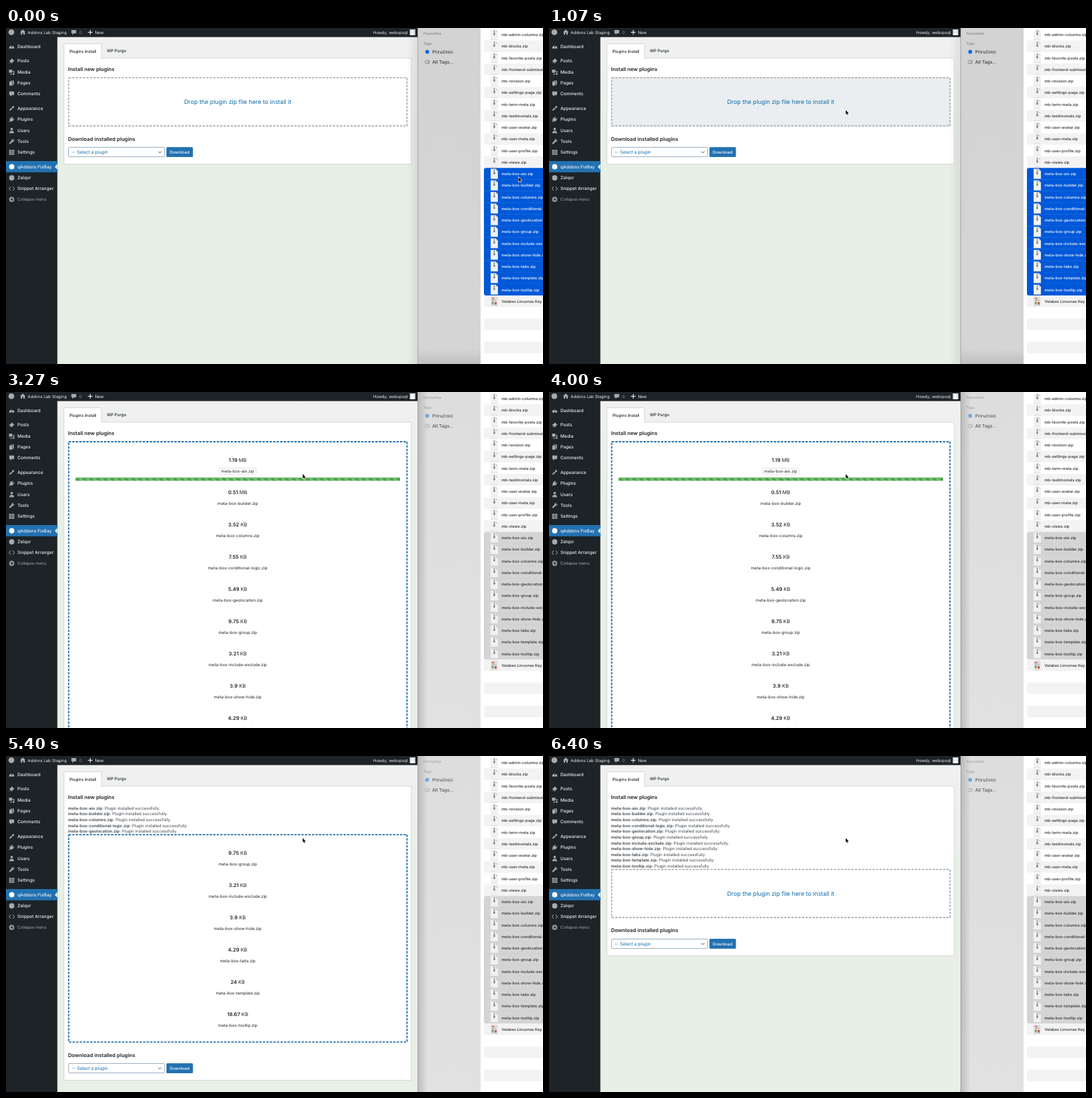
These frames come from a looping animation (800x500 px, 6.73 s). An HTML page with a canvas:

```html
<!DOCTYPE html>
<html lang="en">
<head>
<meta charset="utf-8">
<title>Plugin upload</title>
<style>
html, body { margin: 0; width: 100%; height: 100%; overflow: hidden; background: #e8efe7; }
canvas { display: block; }
</style>
</head>
<body>
<canvas id="stage" width="800" height="500"></canvas>
<script>
const c = document.getElementById('stage').getContext('2d');
const LOOP = 6730, DROP = 1200, ROW = 17.24, LINE = 8.62;
const DARK = '#1d2327', BLUE = '#2271b1', LINK = '#0a6aa6', PAGE = '#e8efe7';

const uploads = [
  ['aio', '1.19', 'MB'], ['builder', '0.51', 'MB'], ['columns', '3.52', 'KB'],
  ['conditional-logic', '7.55', 'KB'], ['geolocation', '5.49', 'KB'], ['group', '9.75', 'KB'],
  ['include-exclude', '3.21', 'KB'], ['show-hide', '3.9', 'KB'], ['tabs', '4.29', 'KB'],
  ['template', '24', 'KB'], ['tooltip', '18.67', 'KB']
].map(([id, size, unit]) => ({ name: `meta-box-${id}.zip`, size, unit }));
const doneAt = [4330, 5130, 5200, 5270, 5400, 5530, 5730, 5930, 6070, 6200, 6400];

const others = ['admin-columns', 'blocks', 'favorite-posts', 'frontend-submission', 'revision',
  'settings-page', 'term-meta', 'testimonials', 'user-avatar', 'user-meta', 'user-profile', 'views'];
const files = [...others.map(n => `mb-${n}.zip`), ...uploads.map(u => u.name), 'Velabex Lincense Key'];

// label, y, icon path around (0,0); "o" marks a plain disc
const menu = [
  ['Dashboard', 27.5, 'M-4 3A4 4 0 1 1 4 3ZM-.5 1.5L2 -2'],
  ['Posts', 49, 'M0 -4L4 0L2.8 .4L1 2.2L.8 4L-1.2 2L-4 4L-2 1.2L-4 -.8L-2.2 -1L-.4 -2.8Z'],
  ['Media', 65.5, 'M-4 -3.5H1V1H-4ZM2 -1.5H4V3A1.3 1.3 0 1 1 2.8 1.8H3V0H2ZM-1 2H0V4H-2.5V3H-1Z'],
  ['Pages', 82, 'M-3.5 -2.5H1V3.8H-3.5ZM-1.5 -3.8H3.2V2.6H1.6V-3.1H-1.5Z'],
  ['Comments', 98, 'M-3.6 -3.4H3.6V1.8H.4L-2 4V1.8H-3.6Z'],
  ['Appearance', 119.5, 'M0 -1L2 -4L4 -2L1.4 .4ZM-.6 -.6L1 1L-1 2.4L-4 4L-2.6 1Z'],
  ['Plugins', 136, 'M1 -4L1.8 -3.4L.6 -1.8L1.8 -.6L3.4 -1.8L4 -1L2.6 .4L3 1L.8 3L-1.4 2.8L-3.6 4L-4 3.6L-2.8 1.4L-3 -.8L-1 -3L-.4 -2.4Z'],
  ['Users', 152.5, 'M0 -4A1.9 1.9 0 1 1 -.01 -4ZM-3.6 4Q-3.4 .2 0 .4Q3.4 .2 3.6 4Z'],
  ['Tools', 169, 'M1 -3.8L3 -3.8L1.4 -2L2.2 -1.2L4 -2.8Q4.2 .4 1.2 .4L-2.4 4L-4 2.4L-.4 -1.2Q-.4 -3.4 1 -3.8Z'],
  ['Settings', 185, 'M-3.8 -3.8H-.4V3.8H-3.8ZM.4 -3.8H3.8V3.8H.4Z'],
  ['qAddons FixBay', 206.5, 'o'],
  ['Zelqor', 223, 'o'],
  ['Snippet Arranger', 239, ''],
  ['Collapse menu', 255, 'o']
];

const clamp = v => Math.max(0, Math.min(1, v));
const ease = v => v * v * (3 - 2 * v);

function rect(x, y, w, h, fill, r = 0) {
  c.fillStyle = fill;
  c.beginPath();
  c.roundRect(x, y, w, h, r);
  c.fill();
}
function frame(x, y, w, h, stroke, r = 0, width = .8) {
  c.strokeStyle = stroke;
  c.lineWidth = width;
  c.beginPath();
  c.roundRect(x, y, w, h, r);
  c.stroke();
}
function disc(x, y, r, fill) {
  c.fillStyle = fill;
  c.beginPath();
  c.arc(x, y, r, 0, 7);
  c.fill();
}
function line(stroke, width, ...pts) {
  c.strokeStyle = stroke;
  c.lineWidth = width;
  c.beginPath();
  for (let i = 0; i < pts.length; i += 2) c.lineTo(pts[i], pts[i + 1]);
  c.stroke();
}
function setFont(size, weight) {
  c.font = `${weight} ${size}px Inter, sans-serif`;
  c.textRendering = 'geometricPrecision';
}
function text(s, x, y, size, fill, weight = 400, align = 'left') {
  setFont(size, weight);
  c.textBaseline = 'middle';
  c.textAlign = align;
  c.fillStyle = fill;
  c.fillText(s, x, y + .5);
  return c.measureText(s).width;
}
function icon(path, x, y, fill) {
  c.save();
  c.translate(x, y);
  c.fillStyle = fill;
  c.fill(new Path2D(path));
  c.restore();
}
function gradient(x0, y0, x1, y1, from, to) {
  const g = c.createLinearGradient(x0, y0, x1, y1);
  g.addColorStop(0, from);
  g.addColorStop(1, to);
  return g;
}
function shade(x0, x1, alpha) {
  rect(Math.min(x0, x1), 0, Math.abs(x1 - x0), 500,
    gradient(x0, 0, x1, 0, `rgba(0,0,0,${alpha})`, 'rgba(0,0,0,0)'));
}

function adminBars() {
  const grey = '#a7aaad', pale = '#f0f0f1';
  rect(0, 0, 76.5, 500, DARK);
  rect(0, 0, 613.5, 13.5, DARK);
  disc(8, 6.3, 4.3, grey);
  icon('M0 -4L4.2 0H3V3.6H.9V1H-.9V3.6H-3V0H-4.2Z', 25, 6.3, grey);
  text('Addons Lab Staging', 32.3, 6.3, 6.1, pale);
  icon(menu[4][2], 101, 6.3, grey);
  text('0', 109, 6.3, 6.1, '#8c8f94');
  line(pale, 1.1, 122, 6.4, 129, 6.4);
  line(pale, 1.1, 125.5, 2.9, 125.5, 9.9);
  text('New', 132.5, 6.3, 6.1, pale);
  text('Howdy, webopsqt', 598.7, 6.3, 6.1, pale, 400, 'right');
  rect(601.5, 2, 8.3, 8.6, '#dcdcde');
  disc(605.6, 5.3, 1.8, '#fff');
  icon('M-3.2 2.5Q-3 -1.2 0 -1.2Q3 -1.2 3.2 2.5Z', 605.6, 8.1, '#fff');

  rect(0, 198, 76.5, 16.8, BLUE);
  icon('M0 -4.2V4.2L-4 0Z', 76.6, 206.5, PAGE);
  menu.forEach(([label, y, path], i) => {
    const active = i === 10, last = i === 13;
    const tint = active ? '#fff' : grey;
    if (path === 'o') disc(8.5, y, 3.9, last ? '#8c8f94' : tint);
    else if (path) icon(path, 8.5, y, tint);
    else {
      line(tint, 1, 7, y - 3, 4.5, y, 7, y + 3);
      line(tint, 1, 10, y - 3, 12.5, y, 10, y + 3);
    }
    if (i === 0) line(DARK, .8, 8.2, y + 1.5, 10, y - 1.6);
    if (i === 9) {
      line(DARK, .8, 6.4, y - 2.5, 6.4, y + 2.5);
      line(DARK, .8, 10.6, y - 2.5, 10.6, y + 2.5);
    }
    if (last) icon('M1.2 -2V2L-1.6 0Z', 8.5, y, DARK);
    text(label, 17, y, last ? 6.15 : 6.6, last ? grey : pale, last ? 400 : 500);
  });
}

function progressBar(y, part) {
  const w = 483.5 * part;
  if (w <= 0) return;
  c.save();
  c.beginPath();
  c.rect(103.5, y, w, 5);
  c.clip();
  rect(103.5, y, w, 5, '#49a548');
  c.fillStyle = '#7abd78';
  for (let x = 96; x < 590; x += 10.4) {
    c.beginPath();
    c.moveTo(x, y);
    c.lineTo(x + 5.2, y);
    c.lineTo(x + 10.2, y + 5);
    c.lineTo(x + 5, y + 5);
    c.fill();
  }
  c.restore();
}

function uploadPart(t, done) {
  if (done === 0) return clamp((t - 1266) / 1995);
  if (done > 1) return 0;
  return t < 4870 ? (t - doneAt[0]) / 1960 : clamp(.276 + (t - 4870) / 270);
}

function panel(t, over) {
  const done = doneAt.filter(at => t >= at).length;
  const left = t >= DROP ? uploads.slice(done) : [];
  const top = 73.6 + LINE * done;
  const height = left.length ? 21.3 + 48 * left.length : 72.4;
  const bottom = top + height;
  const hover = t >= DROP && top < 122;

  rect(86.3, 45, 517.4, bottom + 11.6, '#fff');
  frame(86.3, 45, 517.4, bottom + 11.6, '#cdd1cd');
  rect(86.3, 23.5, 55.8, 22.2, '#fff');
  line('#cdd1cd', .8, 86.3, 45, 86.3, 23.5, 142.1, 23.5, 142.1, 45);
  text('Plugins Install', 94.4, 34.4, 6.1, '#1d2327', 500);
  text('WP Purgo', 150.2, 34, 6.1, '#1d2327', 500);
  text('Install new plugins', 92.5, 60.8, 7.7, DARK, 600);

  uploads.slice(0, done).forEach((u, i) => {
    const y = 77.5 + LINE * i;
    const w = text(u.name + ':', 92.5, y, 6.1, '#3c434a', 600);
    text('Plugin installed successfully.', 94.2 + w, y, 6.1, '#3c434a');
  });

  if (over) rect(93.4, top, 504, height, '#ebeef1');
  c.setLineDash([3.5, 1.75]);
  frame(93.4, top + .4, 504, height - .8, hover ? BLUE : '#a6a8aa', 0, hover ? 1.9 : 1.6);
  c.setLineDash([]);

  if (!left.length) text('Drop the plugin zip file here to install it', 345.2, top + 36.3, 8.8, LINK, 400, 'center');
  left.forEach((u, i) => {
    const y = top + 48 * i;
    setFont(7.5, 600);
    const bold = c.measureText(u.size).width;
    setFont(7.5, 400);
    const x = 345.2 - (bold + c.measureText(' ' + u.unit).width) / 2;
    text(u.size, x, y + 27.5, 7.5, DARK, 600);
    text(' ' + u.unit, x + bold, y + 27.5, 7.5, DARK);
    if (i === 0 && done === 0) frame(317.8, y + 39.8, 54.8, 9, '#d4d4d4', 1, .7);
    text(u.name, 345.2, y + 44.4, 6.1, DARK, 400, 'center');
  });
  if (left.length) progressBar(top + 53.6, uploadPart(t, done));

  text('Download installed plugins', 92.5, bottom + 18.8, 7.7, DARK, 600);
  frame(93.2, bottom + 31.6, 143, 14, '#8196ab', 1.5);
  text('-- Select a plugin', 97.8, bottom + 38.6, 6.6, LINK);
  line('#50575e', 1, 226.8, bottom + 37.6, 229.2, bottom + 39.8, 231.6, bottom + 37.6);
  rect(239, bottom + 31.3, 39.5, 14.6, BLUE, 1.5);
  text('Download', 258.7, bottom + 38.5, 6.1, '#fff', 500, 'center');
}

function fileIcon(y, isDoc) {
  icon('M-5.4 -7.3H2.2L5.4 -4V7.3H-5.4Z', 727.4, y, isDoc ? '#e9e9e6' : '#f1f1f1');
  rect(722, y + 7, 10.8, .5, '#c9c9c9');
  icon('M2.2 -7.3L5.4 -4H2.2Z', 727.4, y, '#cfcfcf');
  if (isDoc) {
    rect(723.4, y - 5.2, 4.4, 2.4, '#d08078');
    rect(723.4, y - 1.8, 7.6, 1, '#9a9a9a');
    rect(723.4, y + .3, 3.6, 4.6, '#8fa98c');
    rect(728, y + 1.2, 3, 4, '#c25a50');
  } else {
    rect(726.6, y - 7, 1.6, 5.6, '#9a9a9a');
    rect(726.3, y - 2.4, 2.2, 3.2, '#777', .8);
  }
}
function fileRow(i, fill) {
  const y = 10 + ROW * i;
  fileIcon(y, i === 23);
  text(files[i], 738.2, y, 5.75, fill, 500);
}

function finder(active) {
  rect(613.5, 0, 93.5, 500, active
    ? gradient(0, 0, 0, 500, '#d3d3d3', '#d5d5d5')
    : gradient(614, 0, 707, 500, '#dddddd', '#e1e1e1'));
  if (active) rect(613.5, 477, 93.5, 23, gradient(0, 477, 0, 500, 'rgba(0,0,0,0)', 'rgba(0,0,0,.1)'));
  const head = active ? '#8a8a8a' : '#a9a9a9', ink = active ? '#3a3a3a' : '#555';
  text('Favourites', 621.7, 7.6, 5.3, head, 600);
  text('Tags', 621.7, 22.8, 5.3, head, 600);
  disc(627.5, 35.4, 2.8, active ? '#0a66e0' : '#70a8e6');
  text('Priručnici', 635, 35.2, 6.8, ink, 500);
  frame(624.2, 48.2, 6.6, 4.8, active ? '#6a6a6a' : '#a4a4a4', 2.4, .7);
  line(active ? '#6a6a6a' : '#a4a4a4', .7, 628, 48.4, 629, 50.6, 628, 52.8);
  text('All Tags...', 635, 50.4, 6.8, ink, 500);

  rect(707, 0, 93, 500, '#fff');
  for (let i = 1; i < 29; i += 2) rect(712, 10 + ROW * (i - .5), 100, ROW, '#f3f3f4', 2.5);
  rect(712, 10 + ROW * 11.5, 100, ROW * 11, active ? '#0058d8' : '#d4d4d4', 3);
  for (let i = 12; i < 22; i++)
    rect(712, 10 + ROW * (i + .5) - .2, 88, .4, active ? '#2f79e2' : '#cbcbcb');
  files.forEach((_, i) => fileRow(i, active && i > 11 && i < 23 ? '#fff' : '#2c2c2c'));
}

function pointer(x, y) {
  const p = new Path2D('M0 0V6.6L1.5 5.3L2.6 7.6L3.7 7.1L2.7 4.9H4.6Z');
  c.save();
  c.translate(x, y);
  c.strokeStyle = '#fff';
  c.lineWidth = 1.1;
  c.stroke(p);
  c.fillStyle = '#111';
  c.fill(p);
  c.restore();
}

function draw(t) {
  const move = ease(clamp((t - 70) / 600));
  const dx = -321.5 * move, dy = -100 * move;
  const active = t < DROP;

  rect(0, 0, 800, 500, gradient(0, 14, 0, 160, '#f0f1f0', PAGE));
  panel(t, active && 763.5 + dx < 597);
  adminBars();
  if (active) shade(613.5, 597, .08);
  finder(active);
  if (!active) shade(613.5, 628, .16);
  rect(613.2, 0, .8, 500, '#9b9b9b');

  if (t >= 70 && t < 1070) {
    c.save();
    c.globalAlpha = .55;
    c.translate(dx, dy);
    for (let i = 12; i < 23; i++) fileRow(i, '#2c2c2c');
    c.restore();
  }
  pointer(763.5 + dx, 222 + dy);
}

const start = performance.now();
function tick() {
  draw((performance.now() - start) % LOOP);
  requestAnimationFrame(tick);
}
tick();
</script>
</body>
</html>
```
